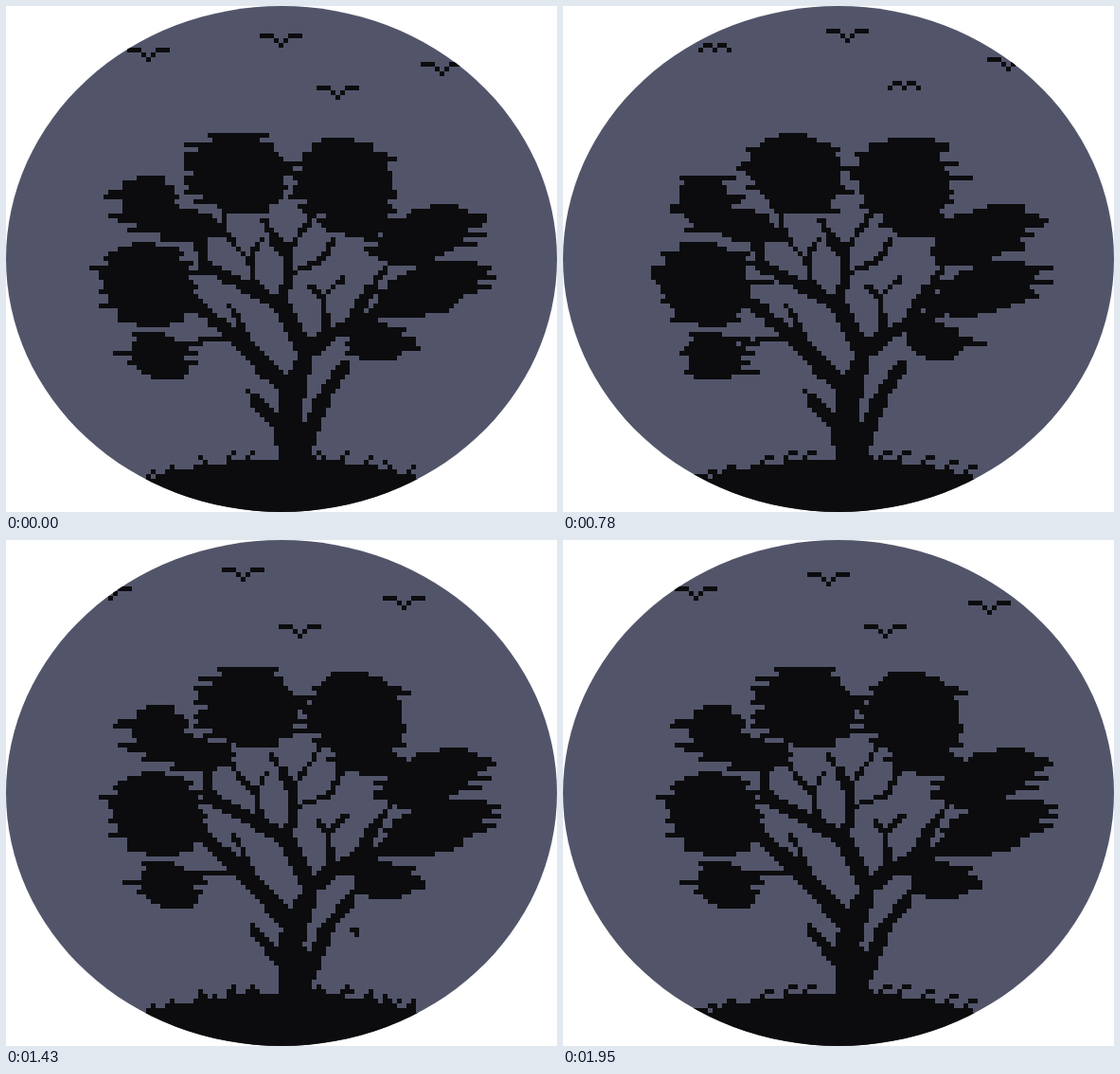
These frames come from a looping animation (582 by 534 pixels, 2080 ms). An HTML page with a canvas:

```html
<!DOCTYPE html>
<html lang="en">
<head>
<meta charset="utf-8">
<title>Tree in the wind</title>
<style>
  html, body { margin: 0; width: 100%; height: 100%; overflow: hidden; background: #fff; }
  canvas { display: block; width: 582px; height: 534px; }
</style>
</head>
<body>
<canvas id="stage" width="582" height="534"></canvas>
<script>
const ctx = document.getElementById("stage").getContext("2d");
const CELL = 5, STEP = 130, COUNT = 16;
const SKY = "#52556a", INK = "#0c0c0e";

// Each pose: sway, longest left tatter, longest right tatter (in cells).
const POSES = {
  rest:  { sway: 0,    left: 4, right: 4 },
  calm:  { sway: 0,    left: 3, right: 5 },
  stir:  { sway: 0.38, left: 4, right: 4 },
  gust:  { sway: 1,    left: 2, right: 7 },
  slack: { sway: 1,    left: 5, right: 4 },
  storm: { sway: 1.85, left: 1, right: 10 }
};
const poseOrder = ("rest stir gust gust slack stir calm gust " +
  "gust storm gust stir calm calm stir stir").split(" ");
const grassOrder = "0111122222211122";

const birdShapes = {
  A: ["###...###", "...#.#...", "....#...."],
  B: ["#.....#", ".#...#.", "..#.#..", "...#..."],
  C: [".##.##.", "#..#..#"],
  D: [".#...#.", "#.#.#.#", "..#.#..", "...#..."]
};
// Drops are counted in cells below the highest point of the flight.
const flocks = [
  { wings: "AAABDCCCCCAAAAAA", drops: "1221000001122222", birds: [[150, 39], [350, 79]] },
  { wings: "AABDCCAAAAAAAAAA", drops: "2322321001123333", birds: [[290, 19], [460, 49]] }
];

// Start width, then the points of the branch.
const branches = [
  [38, 306, 478, 298, 425, 319, 358],
  [16, 314, 358, 290, 312, 210, 272, 205, 250],
  [11, 290, 312, 299, 282, 297, 260, 272, 226],
  [7, 299, 282, 335, 268, 347, 245],
  [5, 298, 258, 328, 215],
  [7, 263, 292, 257, 268, 231, 240, 230, 212],
  [5, 257, 268, 270, 245],
  [20, 318, 362, 345, 342, 425, 308],
  [9, 360, 338, 385, 296, 412, 262],
  [8, 339, 338, 334, 308, 322, 295],
  [5, 335, 306, 355, 288],
  [20, 298, 402, 240, 344, 195, 308],
  [6, 252, 351, 215, 351, 180, 362],
  [6, 253, 346, 235, 314],
  [11, 288, 440, 256, 406],
  [16, 312, 470, 337, 406, 360, 374]
];

// x, y, rx, ry
const crowns = [
  [247, 178, 48, 43], [360, 184, 48, 45], [372, 229, 34, 18],
  [151, 208, 28, 29], [192, 230, 30, 18], [150, 293, 46, 44],
  [161, 367, 29, 25], [442, 243, 45, 32], [445, 298, 46, 29], [393, 357, 30, 21]
];

const leafFalls = [
  { first: 1, dx: 24, dy: 32, starts: [[458, 317], [387, 366], [196, 366]] },
  { first: 8, dx: 38, dy: 42, starts: [[409, 393], [482, 355], [533, 286], [230, 382], [255, 286]] }
];
const tufts = [133, 150, 167, 207, 231, 253, 335, 354, 379, 404, 424];

const snap = (v, edge) => Math.round((v + edge) / CELL) * CELL - edge;

function block(x, y, w = 1, h = 1) {
  ctx.fillRect(snap(x, 2), snap(y, 1), w * CELL, h * CELL);
}

function random(a, b, c) {
  const n = Math.sin(a * 12.99 + b * 78.23 + c * 37.72) * 43758.5;
  return n - Math.floor(n);
}

const tilt = x => (x - 290) * 0.065;

function bend(x, y, sway) {
  const lift = sway * Math.max(0, Math.min(1, (478 - y) / 155));
  return [x + 17 * lift, y + tilt(x) * lift];
}

function drawBranch([from, ...coords], sway) {
  const to = 5 + (from - 5) * 0.3;
  const points = [];
  for (let i = 0; i < coords.length; i += 2) points.push(bend(coords[i], coords[i + 1], sway));
  const spans = points.length - 1;
  for (let i = 0; i < spans; i++) {
    const [ax, ay] = points[i], [bx, by] = points[i + 1];
    const steps = Math.ceil(Math.hypot(bx - ax, by - ay) / 2.5);
    for (let k = 0; k <= steps; k++) {
      const t = k / steps;
      const width = from + (to - from) * (i + t) / spans;
      const cells = Math.max(1, Math.round(width / CELL));
      block(ax + (bx - ax) * t - cells * 2.5, ay + (by - ay) * t - 2.5, cells, Math.min(cells, 2));
    }
  }
}

function drawCrown([x, y, rx, ry], id, pose) {
  const reach = y < 240 ? 31 : x > 300 ? 19 : 26;
  const slant = x > 400 ? -24 : 5;
  const cx = x + reach * pose.sway;
  const cy = y + (tilt(x) + (x > 390 ? 5 : 0)) * pose.sway;
  const rows = Math.round(ry * 2 / CELL);
  const tatter = (row, side, longest) =>
    Math.floor(random(row, id + side, longest) ** 2 * (longest + 1)) * CELL;
  for (let row = 0; row < rows; row++) {
    const v = (row + 0.5) / rows * 2 - 1;
    const half = rx * (1 - Math.abs(v) ** 2.4) ** 0.6;
    const middle = cx + slant * v;
    const left = snap(middle - half - tatter(row, 0, pose.left), 2);
    const right = snap(middle + half + tatter(row, 20, pose.right), 2);
    block(left, cy - ry + row * CELL, Math.max(1, (right - left) / CELL));
  }
}

function groundAt(x) {
  return 479 + 20 * Math.min(1.1, Math.abs(x - 292) / 145) ** 2.5;
}

function drawGround(style) {
  for (let x = 118; x < 468; x += CELL) block(x, groundAt(x), 1, 12);
  tufts.forEach((x, i) => {
    const y = groundAt(x), side = i % 3 ? 1 : -1;
    block(x, y - 5);
    if (style === 2) {
      block(x + 5, y - 10, 2);
    } else {
      block(x + side * 5, y - 10, 1, 1 + style);
      if (style && i % 2) block(x + 10, y - 5);
    }
  });
}

function drawBird(shape, x, y) {
  const rows = birdShapes[shape];
  const left = x - rows[0].length * CELL / 2;
  rows.forEach((row, j) => [...row].forEach((dot, i) => {
    if (dot === "#") block(left + i * CELL, y + j * CELL);
  }));
}

function drawBirds(step) {
  const drift = step < 12 ? Math.min(5 * step, 70 - 10 * step) : 10 * step - 160;
  for (const { wings, drops, birds } of flocks) {
    for (const [x, y] of birds) drawBird(wings[step], x + drift, y + drops[step] * CELL);
  }
}

function drawLeaves({ first, dx, dy, starts }, step) {
  const age = step - first;
  if (age < 0 || age > 4) return;
  for (const [x, y] of starts) {
    const lx = x + dx * age, ly = y + dy * age;
    if (ly > 475) continue;
    block(lx - 5, ly - 5, 1 + age % 2);
    block(lx, ly);
  }
}

function draw(step) {
  const pose = POSES[poseOrder[step]];
  ctx.clearRect(0, 0, 582, 534);
  ctx.save();
  ctx.beginPath();
  ctx.ellipse(291, 267, 291, 267, 0, 0, Math.PI * 2);
  ctx.clip();
  ctx.fillStyle = SKY;
  ctx.fillRect(0, 0, 582, 534);
  ctx.fillStyle = INK;
  drawBirds(step);
  branches.forEach(branch => drawBranch(branch, pose.sway));
  crowns.forEach((crown, id) => drawCrown(crown, id, pose));
  leafFalls.forEach(fall => drawLeaves(fall, step));
  drawGround(+grassOrder[step]);
  ctx.restore();
}

function tick(now) {
  draw(Math.floor(now / STEP) % COUNT);
  requestAnimationFrame(tick);
}
draw(0);
requestAnimationFrame(tick);
</script>
</body>
</html>
```
